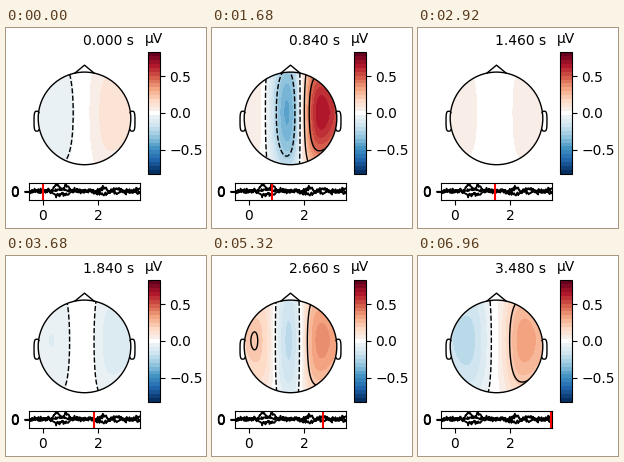
A matplotlib script that plays this animation: 200x200 px, repeating every 7000 ms.

```python
import numpy as np
import matplotlib.pyplot as plt
from matplotlib.animation import FuncAnimation
from matplotlib.colors import ListedColormap
from matplotlib.patches import Circle

SIZE, DPI = 200, 100
STEP, FRAMES = 0.02, 175
CX, CY, R = 78.5, 90.4, 46.3
VMAX = 0.835
LEVELS = -0.03 + 0.24 * np.arange(-2, 4)

# peak time: left, centre and right potential in microvolts
PEAKS = {
    0.00: (-0.10, 0.00, 0.15),
    0.50: (1.05, -0.60, 0.10),
    0.84: (0.12, -0.60, 0.88),
    1.46: (0.07, -0.04, 0.07),
    2.20: (0.45, -0.58, 0.75),
    2.66: (0.32, -0.34, 0.50),
    3.48: (-0.30, 0.00, 0.42),
}
SENSORS = (-0.64, -0.06, 0.60)

times = np.array(list(PEAKS))
peaks = np.array(list(PEAKS.values()))
rng = np.random.default_rng(4)
freqs = rng.uniform(1.5, 4, (3, 3))
phases = rng.uniform(0, 2 * np.pi, (3, 3))


def potentials(t):
    """Sensor values: a bump at each peak, gentle waves in between."""
    bumps = np.exp(-((t - times) / 0.15) ** 2)
    waves = np.sin(2 * np.pi * freqs * t + phases).sum(axis=1)
    return bumps @ peaks + 0.07 * (1 - bumps.max()) * waves


grid = np.linspace(-1.03, 1.03, 120)
U, V = np.meshgrid(grid, grid)
weights = np.array([np.exp(-((U - s) / 0.42) ** 2) for s in SENSORS])
weights /= weights.sum(axis=0)
weights *= 1 - 0.4 * (U ** 2 + (V + 0.12) ** 2)


def field(t):
    return np.tensordot(potentials(t), weights, 1)


def box(x0, y0, x1, y1):
    """Pixel corners, measured from the top, to a figure rectangle."""
    return [x0 / SIZE, 1 - y1 / SIZE, (x1 - x0) / SIZE, (y1 - y0) / SIZE]


def bend(a):
    return np.sign(a) * np.abs(a) ** 0.6


fig = plt.figure(figsize=(SIZE / DPI, SIZE / DPI), dpi=DPI, facecolor="white")
ax = fig.add_axes([0, 0, 1, 1])
ax.axis("off")

# head
shades = plt.get_cmap("RdBu_r")(np.linspace(0, 1, 31))
shades[15] = 1
head = Circle((CX, CY), R, fc="none", ec="k", lw=1, zorder=4)
X, Y = CX + R * U, CY + R * V
edge = 1.03 * R
im = ax.imshow(field(0), extent=(CX - edge, CX + edge, CY + edge, CY - edge),
               cmap=ListedColormap(shades), vmin=-VMAX, vmax=VMAX,
               interpolation="bilinear", aspect="auto")
ax.set(xlim=(0, SIZE), ylim=(SIZE, 0))
ax.add_patch(head)
im.set_clip_path(head)

turn = np.radians(np.linspace(130, -130, 40))
ear_x = 1.03 + 0.06 * bend(np.cos(turn))
ear_y = -0.06 + 0.215 * bend(np.sin(turn))
nose_x, nose_y = np.array([-0.208, 0, 0.208]), np.array([0.978, 1.15, 0.978])
for x, y in ((nose_x, nose_y), (ear_x, ear_y), (-ear_x, ear_y)):
    ax.plot(CX + R * x, CY - R * y, "k", lw=1, zorder=4)

clock = ax.text(128, 17, "", ha="right", va="baseline", fontsize=10)
ax.text(147.7, 15, "µV", ha="center", va="baseline", fontsize=10)

# colour scale
cax = fig.add_axes(box(142, 24, 153.5, 146))
fig.colorbar(im, cax=cax, ticks=[-0.5, 0, 0.5])

# signal traces
line_ax = fig.add_axes(box(23, 155, 134, 171.5))
ts = np.arange(-0.5, 3.5, STEP)
signal = np.array([potentials(t) for t in ts])
noise = rng.normal(0, 0.9, signal.shape)
line_ax.plot(ts, 6 * signal + noise, "k", lw=1.2)
line_ax.set(xlim=(-0.5, 3.5), ylim=(-8.2, 8.2), xticks=[0, 2])
line_ax.set_yticks([-0.4, 0, 0.4], ["0"] * 3)
marker = line_ax.axvline(0, color="r", lw=1.5, zorder=2.4)

contours = None


def draw(i):
    global contours
    t = i * STEP
    z = field(t)
    im.set_data(z)
    if contours is not None:
        contours.remove()
    contours = ax.contour(X, Y, z, levels=LEVELS, colors="k", linewidths=1)
    contours.set_clip_path(head)
    clock.set_text(f"{t:.3f} s")
    marker.set_xdata([t, t])
    return im, clock, marker


anim = FuncAnimation(fig, draw, frames=FRAMES, interval=40,
                     init_func=lambda: draw(0), repeat=True, repeat_delay=0)
plt.show()
```
